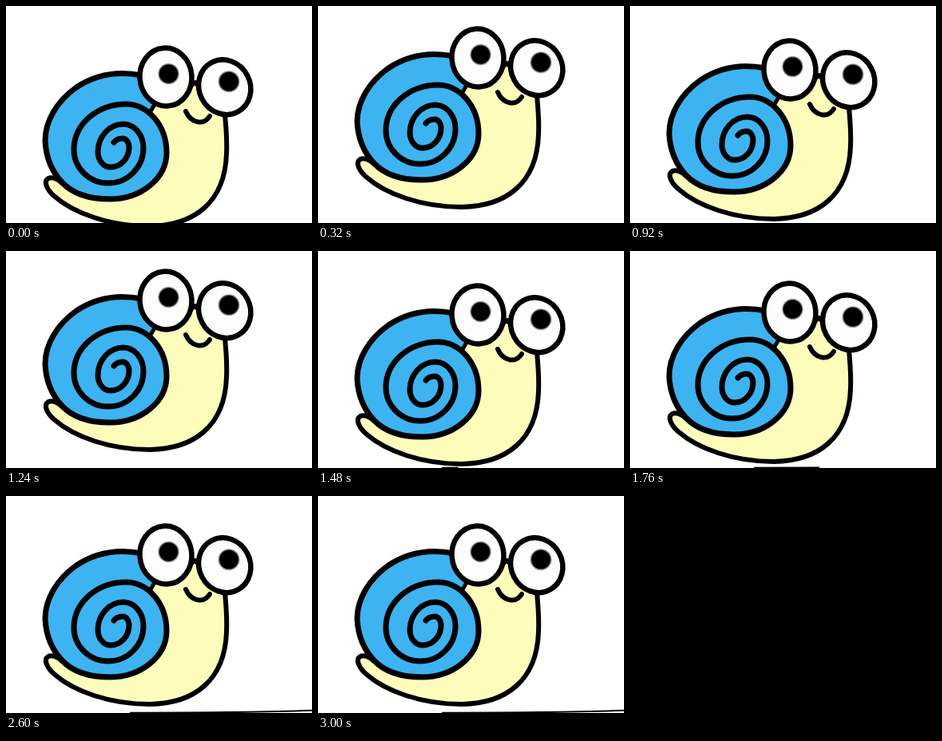
Recreate the animation shown at these times as an HTML page. Size 383 by 272 pixels, loop 3.04 s.

```html
<!DOCTYPE html>
<html lang="en">
<head>
<meta charset="utf-8">
<title>Bobbing snail</title>
<style>
html, body { margin: 0; width: 100%; height: 100%; overflow: hidden; background: #fff; }
svg { display: block; width: 383px; height: 272px; }
</style>
</head>
<body>
<svg viewBox="0 0 383 272" fill="none" stroke="#000" stroke-linecap="round" stroke-linejoin="round">
  <defs>
    <radialGradient id="pupil">
      <stop offset=".82"/>
      <stop offset="1" stop-color="#777" stop-opacity=".3"/>
    </radialGradient>
  </defs>
  <g id="snail">
    <path fill="#fefcbb" stroke-width="6" d="M70 197C64 191 57 189 53 191C46 195 52 206 60 213C85 235 130 251 180 251C235 250 274 222 276 160C277 140 275 125 274 110L237 71L190 95"/>
    <path id="shell" fill="#3db3f1" stroke="none"/>
    <path id="spiral" stroke-width="7"/>
    <path stroke-width="5" d="M188 95L181 107"/>
    <g fill="#fcfcfc" stroke-width="6.5">
      <ellipse cx="200" cy="64" rx="32.5" ry="36.5" transform="rotate(-5 200 64)"/>
      <ellipse cx="273.7" cy="76.7" rx="32" ry="35" transform="rotate(-28 273.7 76.7)"/>
    </g>
    <g fill="url(#pupil)" stroke="none">
      <circle cx="203.5" cy="60" r="13.5"/>
      <circle cx="279" cy="69.7" r="13.8"/>
    </g>
    <path stroke-width="6" d="M225 107C231 121 247 126 255 113"/>
  </g>
  <path id="ground" stroke-width="2" stroke-linecap="butt" d="M155 271.8Q310 271.6 385 268.8"/>
</svg>
<script>
const el = id => document.getElementById(id);
const LOOP = 3040, STEP = 40;

// Extremes of the spiral; each neighbouring pair is joined by a quarter ellipse.
const turns = [[201, 159], [150, 98], [85, 155], [128, 197], [172, 153], [147, 123],
  [115, 158], [131, 177], [154, 152], [146, 141]];
const rim = 'M170 62C140 56 112 61 88 77C64 94 49 119 49 144C50 164 57 182 70 196C84 211 105 217 130 217';
let [px, py] = [130, 217];
const arcs = turns.map(([x, y]) => {
  const arc = `A${Math.abs(x - px)} ${Math.abs(y - py)} 0 0 0 ${x} ${y}`;
  [px, py] = [x, y];
  return arc;
});
el('spiral').setAttribute('d', rim + arcs.join('') + 'Q139 141 135 146');
el('shell').setAttribute('d', rim + arcs[0] + 'Q200 125 181 107L190 90Z');

const start = performance.now();

function draw() {
  const frame = Math.floor((performance.now() - start) % LOOP / STEP);
  // Triangle wave: 3 px per step, ten steps up and ten down.
  const bob = 3 * Math.abs(10 - frame % 20) - 5;
  el('snail').setAttribute('transform', `translate(0 ${bob})`);

  // The ground line is drawn from left to right.
  const drawn = Math.max(0, 82 + 8.8 * (frame - 44));
  el('ground').setAttribute('stroke-dasharray', `${drawn} 999`);
  requestAnimationFrame(draw);
}
draw();
</script>
</body>
</html>
```
